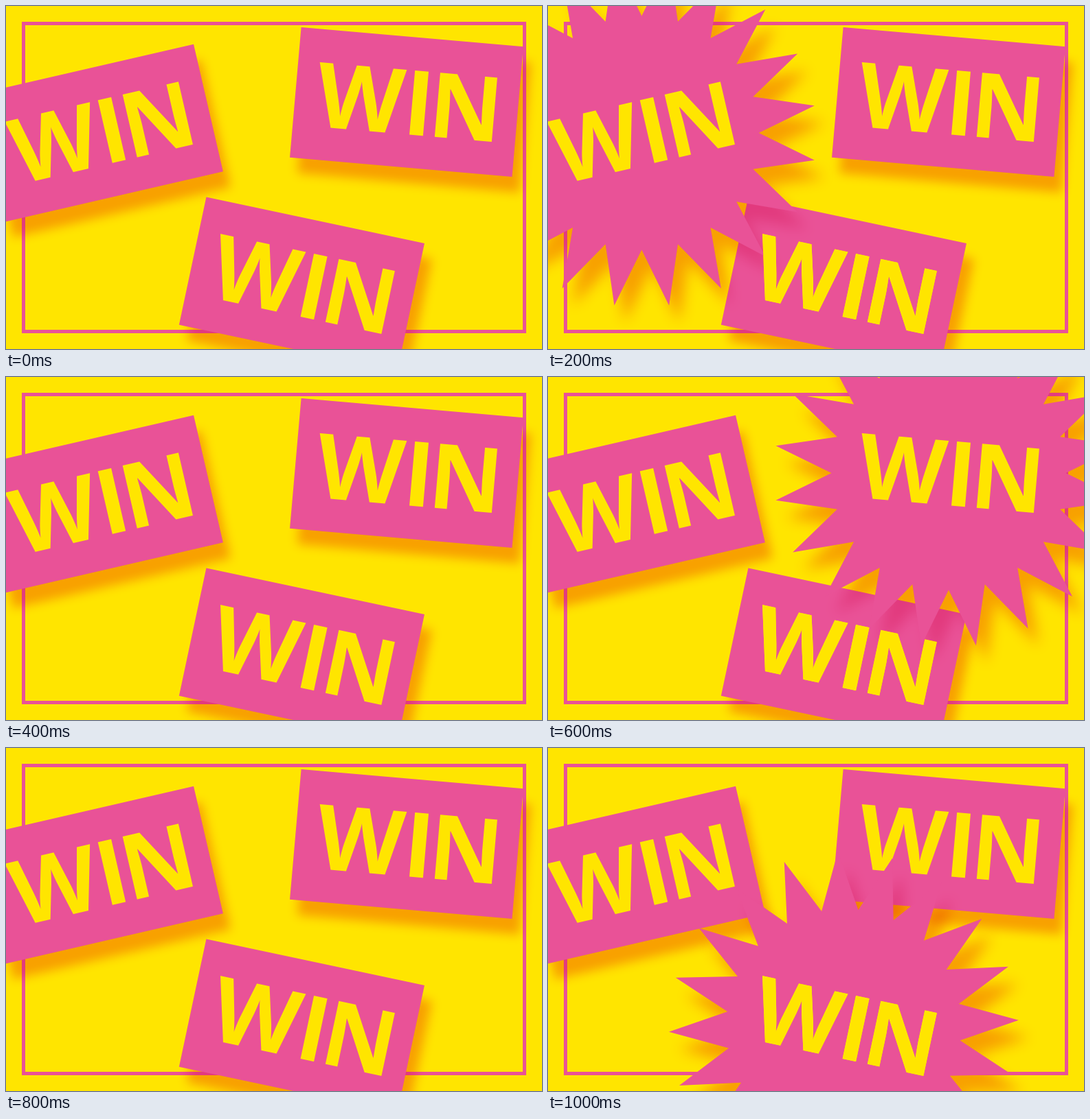
These frames come from a looping animation (780x500 px, 1200 ms). An HTML page with a canvas:

```html
<!DOCTYPE html>
<html lang="en">
<head>
<meta charset="utf-8">
<title>WIN</title>
<style>
  html, body { margin: 0; width: 100%; height: 100%; overflow: hidden; background: #ffe500; }
  canvas { display: block; }
</style>
</head>
<body>
<canvas id="stage" width="780" height="500" role="img" aria-label="WIN WIN WIN"></canvas>
<script>
const ctx = document.getElementById('stage').getContext('2d');
const PINK = '#e95297', YELLOW = '#ffe500', SHADE = 'rgb(248,179,212)';
const RAD = Math.PI / 180, STEP = 200, FAR = 2000;

// tilt turns the card and its word, spin turns the star
const cards = [
  { x: 136.3, y: 185, tilt: -13, spin: 0 },
  { x: 583, y: 140, tilt: 5, spin: 0 },
  { x: 430.4, y: 405.3, tilt: 12, spin: 7.1 }
];
// centre of each letter, measured from the middle of the card
const letters = [['W', -67.4], ['I', 18.1], ['N', 86.8]];

function cardPath() {
  const path = new Path2D();
  path.rect(-162.3, -95.2, 324.6, 190.4);
  return path;
}

function starPath(points, outer, inner) {
  const path = new Path2D();
  for (let i = 0; i < points * 2; i++) {
    const a = i * Math.PI / points, r = i % 2 ? outer : inner;
    path.lineTo(r * Math.cos(a), r * Math.sin(a));
  }
  path.closePath();
  return path;
}

const card = cardPath();
const star = starPath(20, 254.6, 170.5);

function place(x, y, angle, paint) {
  ctx.save();
  ctx.translate(x, y);
  ctx.rotate(angle * RAD);
  paint();
  ctx.restore();
}

function shape(path, c, angle, dx, dy, blur) {
  // only the shadow lands on the stage; it multiplies with what lies below
  place(c.x - FAR, c.y, angle, () => {
    ctx.globalCompositeOperation = 'multiply';
    ctx.shadowColor = SHADE;
    ctx.shadowOffsetX = FAR + dx;
    ctx.shadowOffsetY = dy;
    ctx.shadowBlur = blur;
    ctx.fillStyle = '#000';
    ctx.fill(path);
  });
  place(c.x, c.y, angle, () => {
    ctx.fillStyle = PINK;
    ctx.fill(path);
  });
}

function word(c) {
  place(c.x, c.y, c.tilt, () => {
    ctx.fillStyle = YELLOW;
    ctx.font = '700 131.6px "Open Sans", "Noto Sans", sans-serif';
    ctx.textAlign = 'center';
    for (const [ch, x] of letters) ctx.fillText(ch, x, 47);
  });
}

function draw(now) {
  const step = Math.floor(now / STEP) % 6;
  const burst = step % 2 ? cards[(step - 1) / 2] : null;

  ctx.fillStyle = YELLOW;
  ctx.fillRect(0, 0, 780, 500);
  ctx.strokeStyle = PINK;
  ctx.lineWidth = 5;
  ctx.strokeRect(25.5, 25.5, 729, 449);

  for (const c of cards) {
    if (c !== burst) shape(card, c, c.tilt, 11, 23, 15);
  }
  cards.forEach(word);
  if (burst) {
    shape(star, burst, burst.spin, 15, 25, 20);
    word(burst);
    word(cards[2]);
  }
  requestAnimationFrame(draw);
}
requestAnimationFrame(draw);
</script>
</body>
</html>
```
